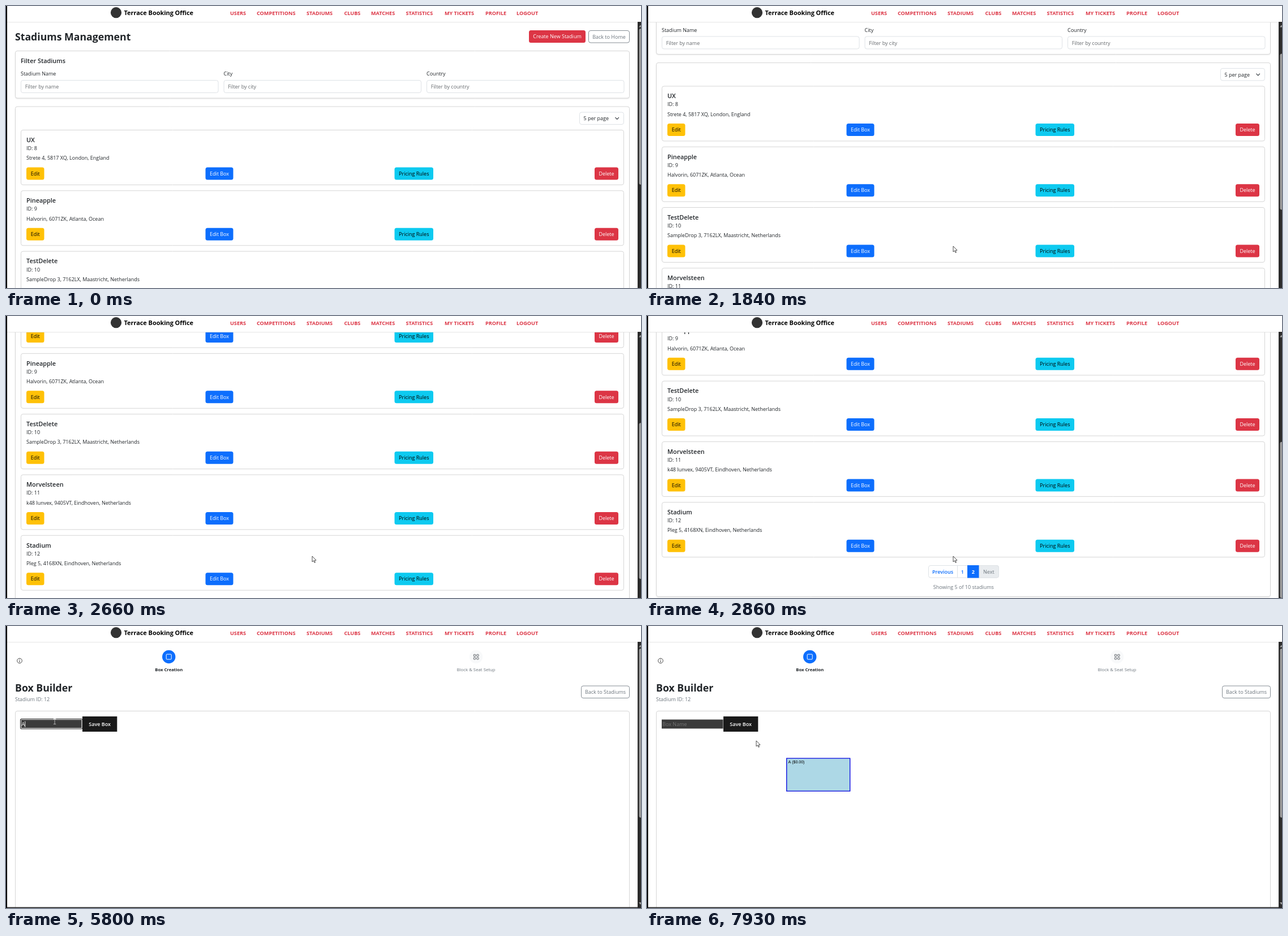
Recreate the animation shown at these times as an HTML page with a canvas. Size 1122x499 px, loop 8 s.

```html
<!DOCTYPE html>
<html lang="en">
<head>
<meta charset="utf-8">
<title>Stadium admin</title>
<style>
  html, body { margin: 0; width: 100%; height: 100%; overflow: hidden; background: #fff; }
  canvas { display: block; }
</style>
</head>
<body>
<canvas id="stage" width="1122" height="499"></canvas>
<script>
const ctx = document.getElementById('stage').getContext('2d');
const W = 1122, H = 499, LOOP = 8000;
const FONT = '"Open Sans", "Noto Sans", sans-serif';
const INK = '#212529', GREY = '#6c757d', LINE = '#d6d6d6';
const BLUE = '#0d6efd', RED = '#dc3545', YELLOW = '#ffc107', CYAN = '#0dcaf0';

const NAV = [['USERS', 396], ['COMPETITIONS', 443], ['STADIUMS', 531], ['CLUBS', 597.5],
  ['MATCHES', 645], ['STATISTICS', 706.5], ['MY TICKETS', 775], ['PROFILE', 847], ['LOGOUT', 902]];

const STADIUMS = [
  ['UX', 'Strete 4, 5817 XQ, London, England'],
  ['Pineapple', 'Halvorin, 6071ZK, Atlanta, Ocean'],
  ['TestDelete', 'SampleDrop 3, 7162LX, Maastricht, Netherlands'],
  ['Morvelsteen', 'k48 lunvex, 9405VT, Eindhoven, Netherlands'],
  ['Stadium', 'Pleg 5, 4168XN, Eindhoven, Netherlands']
];

// Event times in ms
const SHOW_CURSOR = 250, OPEN_BUILDER = 4460, FOCUS = 5400, TYPE = 5800, PRESS = 6870, RELEASE = 7520;

// Movement is sampled 15 times a second, like a screen recording
const STEP = 1000 / 15, PHASE = 40;
const held = t => Math.floor((t - PHASE) / STEP + 1e-6) * STEP + PHASE;

// time, x, y of the pointer
const POINTER = [
  [240, 895, 490], [440, 616, 474], [715, 616, 474], [840, 541, 425],
  [3450, 541, 425], [3840, 480, 434], [4240, 374, 403], [4440, 374, 403],
  [4840, 112, 168], [5050, 112, 168], [5570, 86, 169], [5930, 86, 169],
  [6570, 249, 247], [6770, 246, 234], [6840, 246, 234],
  [7500, 359, 292], [7640, 352, 289], [7900, 193, 203]
];

const clamp01 = v => Math.max(0, Math.min(1, v));
const smooth = p => p * p * (3 - 2 * p);
const glide = (t, from, to) => 1 - Math.pow(1 - clamp01((t - from) / (to - from)), 1.2);

function pointerAt(t) {
  let i = 0;
  while (i < POINTER.length - 2 && t >= POINTER[i + 1][0]) i++;
  const [t0, x0, y0] = POINTER[i], [t1, x1, y1] = POINTER[i + 1];
  const p = smooth(clamp01((t - t0) / (t1 - t0)));
  return { x: x0 + (x1 - x0) * p, y: y0 + (y1 - y0) * p };
}

const scrollAt = t => 157.5 * glide(t, 1536, 2240) + 161.5 * glide(t, 2374, 2840);

// Text placed by the vertical centre of its capitals
function text(str, x, cy, { size = 9, weight = 400, color = INK, align = 'left', font = FONT } = {}) {
  ctx.font = `${weight} ${size}px ${font}`;
  ctx.fillStyle = color;
  ctx.textAlign = align;
  ctx.fillText(str, x, cy + size * 0.357);
}

function rect(x, y, w, h, color) {
  ctx.fillStyle = color;
  ctx.fillRect(x, y, w, h);
}

function box(x, y, w, h, { fill, stroke, r = 3.5, line = 1 } = {}) {
  ctx.beginPath();
  ctx.roundRect(x, y, w, h, r);
  if (fill) { ctx.fillStyle = fill; ctx.fill(); }
  if (stroke) { ctx.strokeStyle = stroke; ctx.lineWidth = line; ctx.stroke(); }
}

function disc(x, y, r, color) {
  ctx.fillStyle = color;
  ctx.beginPath();
  ctx.arc(x, y, r, 0, Math.PI * 2);
  ctx.fill();
}

function poly(points, color) {
  ctx.beginPath();
  points.forEach(([x, y]) => ctx.lineTo(x, y));
  ctx.closePath();
  ctx.fillStyle = color;
  ctx.fill();
}

function button(label, x, y, w, fill, color) {
  box(x, y, w, 22, { fill });
  text(label, x + w / 2, y + 11, { color, align: 'center' });
}

function outlineButton(label, x, y, w) {
  box(x + 0.5, y + 0.5, w - 1, 21.5, { fill: '#fff', stroke: '#868e95' });
  text(label, x + w / 2, y + 11.3, { color: GREY, align: 'center' });
}

function card(x, y, w, h, shadow) {
  ctx.save();
  if (shadow) {
    ctx.shadowColor = 'rgba(0,0,0,.1)';
    ctx.shadowBlur = 2.5;
    ctx.shadowOffsetY = 1.2;
  }
  box(x + 0.5, y + 0.5, w - 1, h - 1, { fill: '#fff' });
  ctx.restore();
  box(x + 0.5, y + 0.5, w - 1, h - 1, { stroke: LINE });
}

function filterField(label, hint, x, y) {
  text(label, x, y);
  box(x + 0.5, y + 11.5, 348.5, 22, { stroke: '#dee2e6' });
  text(hint, x + 7.7, y + 23, { color: '#65696d' });
}

function stadiumCard([name, address], id, y, pointer) {
  card(26, y, 1066, 98);
  text(name, 36, y + 18, { size: 10.9, weight: 600 });
  text('ID: ' + id, 36, y + 32.7);
  text(address, 36, y + 50);
  const top = y + 66.5;
  const hover = pointer && pointer.x > 352.5 && pointer.x < 401.5 && pointer.y > top && pointer.y < top + 22;
  button('Edit', 36, top, 31.5, YELLOW, '#000');
  button('Edit Box', 352.5, top, 49, hover ? '#0b5ed7' : BLUE, '#fff');
  button('Pricing Rules', 686.5, top, 68.5, CYAN, '#000');
  button('Delete', 1040, top, 42, RED, '#fff');
}

function pagination(y) {
  box(497.5, y + 0.5, 124, 21.5, { fill: '#fff', stroke: '#dee2e6' });
  box(586, y + 0.5, 35.5, 21.5, { fill: '#e9ecef', stroke: '#dee2e6', r: [0, 3.5, 3.5, 0] });
  rect(548, y, 1, 22, '#dee2e6');
  rect(566, y, 20.5, 22.5, BLUE);
  const cell = (s, x, color, weight) => text(s, x, y + 11.5, { color, weight, align: 'center' });
  cell('Previous', 522.5, BLUE, 600);
  cell('1', 557.3, BLUE, 600);
  cell('2', 576.3, '#fff', 700);
  cell('Next', 603.8, GREY, 400);
}

function listPage(scroll, pointer) {
  const top = -scroll;
  text('Stadiums Management', 16, top + 55, { size: 17.7, weight: 700 });
  button('Create New Stadium', 924, top + 43, 100, RED, '#fff');
  outlineButton('Back to Home', 1029, top + 43, 73);

  card(16, top + 79, 1086, 84.5, true);
  text('Filter Stadiums', 26, top + 97, { size: 10.9, weight: 600 });
  filterField('Stadium Name', 'Filter by name', 26, top + 120);
  filterField('City', 'Filter by city', 384.5, top + 120);
  filterField('Country', 'Filter by country', 743, top + 120);

  card(16, top + 177.5, 1086, 638.5, true);
  box(1013.5, top + 188, 78, 21.5, { stroke: '#dee2e6' });
  text('5 per page', 1020.5, top + 199);
  ctx.beginPath();
  ctx.moveTo(1076.5, top + 197.2);
  ctx.lineTo(1079.7, top + 200.4);
  ctx.lineTo(1082.9, top + 197.2);
  ctx.strokeStyle = '#343a40';
  ctx.lineWidth = 1.2;
  ctx.stroke();

  STADIUMS.forEach((s, i) => stadiumCard(s, 8 + i, top + 219 + i * 107.3, pointer));
  pagination(top + 760);
  text('Showing 5 of 10 stadiums', 559.3, top + 799, { color: GREY, align: 'center' });
  scrollbar(40 + scroll * 0.573, 276);
}

function steps() {
  ctx.strokeStyle = '#333';
  ctx.lineWidth = 0.9;
  ctx.beginPath();
  ctx.arc(24, 61.5, 4.3, 0, Math.PI * 2);
  ctx.stroke();
  rect(23.5, 61, 1, 3, '#333');
  rect(23.5, 59, 1, 1, '#333');

  disc(287.7, 54.5, 11.7, BLUE);
  box(283.2, 50, 9, 9, { stroke: '#fff', r: 1 });
  text('Box Creation', 287.8, 77.5, { size: 7.7, weight: 700, align: 'center' });

  disc(830.5, 54.5, 11.7, '#f8f9fa');
  for (const x of [826.3, 831.7])
    for (const y of [50.3, 55.7]) box(x, y, 3.4, 3.4, { stroke: '#555b60', r: 0.6, line: 0.9 });
  text('Block & Seat Setup', 830.6, 77.5, { size: 7.8, color: GREY, align: 'center' });
}

function nameField(t) {
  const focused = t >= FOCUS && t < PRESS;
  const typed = t >= TYPE && t < RELEASE;
  rect(26, 165.5, 108.5, 16, '#3b3b3b');
  if (focused) {
    box(25.5, 164.5, 109.5, 17.5, { stroke: '#101010', r: 1.5 });
    box(26.5, 165.5, 107.5, 15.5, { stroke: '#fff', r: 1 });
  }
  if (typed) text('A', 27.6, 174, { color: '#fff' });
  else text('Box Name', 27.2, 174, { color: '#757575' });
  const since = t - (typed ? TYPE : FOCUS);
  if (focused && since % 1000 < 500) rect(typed ? 33.3 : 27.5, 168.5, 0.9, 10.5, '#fff');
}

function drawnBox(t, pointer) {
  if (t < PRESS) return;
  const done = t >= RELEASE;
  const w = done ? 112 : pointer.x - 246.5, h = done ? 58 : pointer.y - 234;
  box(246.7, 234.2, Math.max(0, w), Math.max(0, h), { fill: '#add8e6', stroke: '#0000e0', r: 0, line: 1.3 });
  if (done) text('A ($0.00)', 249.6, 240.3, { size: 7, color: '#000', font: '"Liberation Sans", Arial, sans-serif' });
}

function builderPage(t, pointer) {
  steps();
  text('Box Builder', 16, 109.5, { size: 17.7, weight: 700 });
  text('Stadium ID: 12', 16, 129.3, { color: GREY });
  outlineButton('Back to Stadiums', 1016, 105.5, 86);
  card(16, 150, 1086, 380);
  nameField(t);
  rect(135, 160, 61.3, 27, '#1a1a1a');
  text('Save Box', 165.6, 174, { weight: 600, color: '#fff', align: 'center' });
  drawnBox(t, pointer);
  scrollbar(40, 299);
  poly([[1118, 489], [1124, 489], [1121, 493]], '#9a9a9a');
  rect(0, 497.5, W, 1.5, '#222');
}

function scrollbar(y, h) {
  rect(1116, 28, 6, H - 28, '#2b2b2b');
  poly([[1118, 37.5], [1124, 37.5], [1121, 33.5]], '#9a9a9a');
  box(1118.5, y, 8, h, { fill: '#9a9a9a', r: 3 });
}

function header() {
  rect(0, 0, W, 28, '#fff');
  rect(0, 28, 1116, 1, '#e9e9e9');
  rect(0, 29, 1116, 1, 'rgba(0,0,0,.025)');
  disc(194.5, 11.7, 9.6, '#333');
  text('Terrace Booking Office', 208.5, 12.5, { size: 10.9, weight: 700, color: '#000' });
  for (const [label, x] of NAV) text(label, x, 12.3, { size: 9.1, weight: 700, color: RED });
}

function arrow({ x, y }) {
  const shape = [[0, 0], [0, 10], [2.4, 7.9], [4, 11.5], [5.5, 10.9], [4, 7.4], [7, 7.2]];
  poly(shape.map(([dx, dy]) => [x + dx, y + dy]), '#fff');
  ctx.strokeStyle = '#222';
  ctx.lineWidth = 0.8;
  ctx.stroke();
}

function ibeam({ x, y }) {
  rect(x - 0.4, y - 5, 0.9, 10, '#bbb');
  rect(x - 2.2, y - 5, 4.5, 0.9, '#bbb');
  rect(x - 2.2, y + 4.2, 4.5, 0.9, '#bbb');
}

function draw(t) {
  const pointer = t >= SHOW_CURSOR ? pointerAt(held(t)) : null;
  const building = t >= OPEN_BUILDER;
  rect(0, 0, W, H, '#fff');
  if (building) builderPage(t, pointer);
  else listPage(scrollAt(held(t)), pointer);
  header();
  rect(0, 0, 2, H, '#000');
  if (!pointer) return;
  const overField = building && pointer.x > 26 && pointer.x < 135 && pointer.y > 164 && pointer.y < 182;
  (overField ? ibeam : arrow)(pointer);
}

const start = performance.now();
function tick() {
  draw((performance.now() - start) % LOOP);
  requestAnimationFrame(tick);
}
tick();
</script>
</body>
</html>
```
